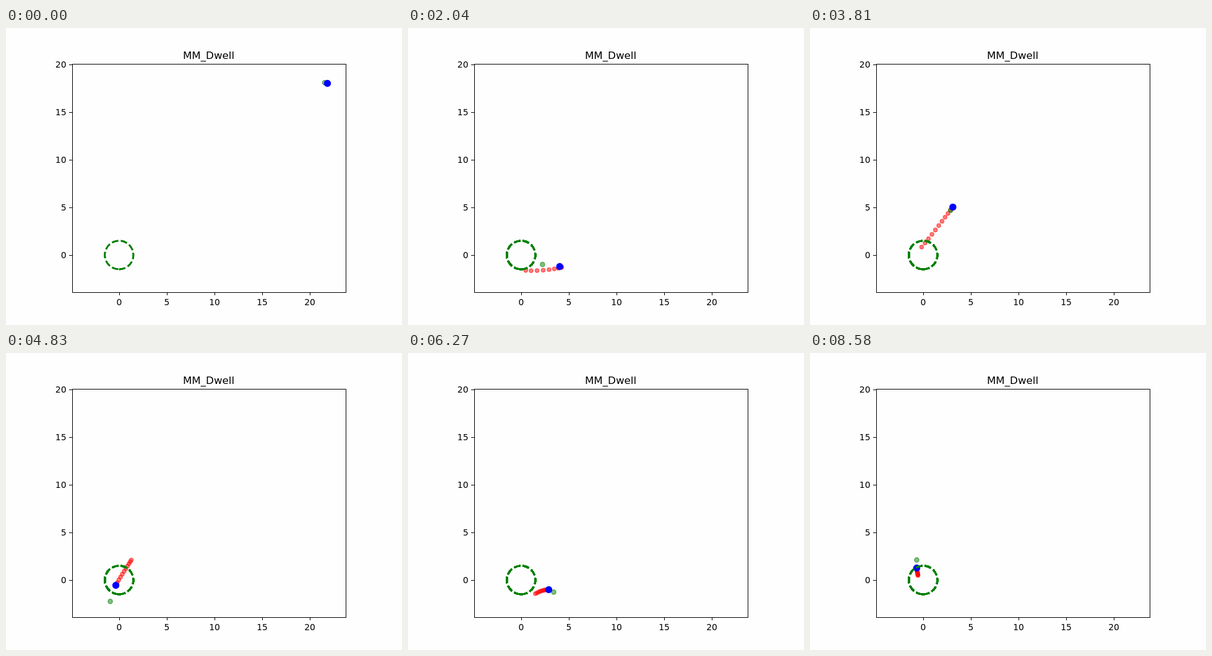
Animation, 640 px wide and 480 px high, one loop 8.61 s. Source, as an HTML page with a canvas:

```html
<!DOCTYPE html>
<html lang="en">
<head>
<meta charset="utf-8">
<title>MM_Dwell</title>
<style>
  html, body { margin: 0; width: 100%; height: 100%; overflow: hidden; background: #fefefe; }
  canvas { display: block; width: 640px; height: 480px; }
</style>
</head>
<body>
<canvas id="plot" width="640" height="480"></canvas>
<script>
const ctx = document.getElementById('plot').getContext('2d');
const STEP = 30, STEPS = 287, TRAIL = 10;
const AHEAD = 6, REACH = 28;
const ORIGIN = { x: 182.8, y: 366.9 }, UNIT = 15.4;

// Turning points of the cursor: step, x, y
const path = [
  // approach
  [0, 519, 89], [20, 499, 88], [32, 449, 110], [36, 415, 152],
  [39, 369, 188], [42, 302, 237], [48, 188, 338],
  // swinging around the ring
  [56, 178, 388], [66, 248, 386], [84, 159, 374], [94, 140, 359],
  [100, 135, 345], [112, 157, 376], [129, 236, 282], [137, 210, 316],
  [151, 202, 334], [161, 177, 375], [167, 168, 401], [181, 170, 362],
  [195, 196, 390], [203, 215, 384], [209, 227, 382], [215, 235, 386],
  [227, 195, 381], [237, 166, 373], [243, 154, 362], [252, 174, 374],
  [276, 174, 359], [286, 172, 347], [292, 172, 334]
];

// Smooth curve through unevenly timed points
function at(t) {
  let i = 0;
  while (i < path.length - 2 && path[i + 1][0] <= t) i++;
  const a = path[i], b = path[i + 1], h = b[0] - a[0], u = (t - a[0]) / h;
  const p = path[Math.max(i - 1, 0)], q = path[Math.min(i + 2, path.length - 1)];
  const u2 = u * u, u3 = u2 * u;
  return [1, 2].map(k => {
    const m0 = (b[k] - p[k]) / (b[0] - p[0]) * h;
    const m1 = (q[k] - a[k]) / (q[0] - a[0]) * h;
    return (2 * u3 - 3 * u2 + 1) * a[k] + (u3 - 2 * u2 + u) * m0 +
      (3 * u2 - 2 * u3) * b[k] + (u3 - u2) * m1;
  });
}

// Predicted position: a few steps ahead, within a limited distance
function predict(n) {
  const [x, y] = at(n), [fx, fy] = at(n + AHEAD);
  const k = Math.min(1, REACH / Math.hypot(fx - x, fy - y));
  return [x + (fx - x) * k, y + (fy - y) * k];
}

function dot([x, y], r, color, alpha) {
  ctx.globalAlpha = alpha;
  ctx.fillStyle = ctx.strokeStyle = color;
  ctx.lineWidth = 1.39;
  ctx.beginPath();
  ctx.arc(x + 0.5, y + 0.5, r, 0, 2 * Math.PI);
  ctx.fill();
  ctx.stroke();
  ctx.globalAlpha = 1;
}

function label(text, x, y, size, align) {
  ctx.font = size + 'px "DejaVu Sans", sans-serif';
  ctx.textAlign = align;
  ctx.fillText(text, x, y);
}

function axes() {
  ctx.fillStyle = ctx.strokeStyle = '#000';
  ctx.lineWidth = 1;
  ctx.strokeRect(107.5, 58.5, 442, 369);
  for (let v = 0; v <= 20; v += 5) {
    const x = Math.round(ORIGIN.x + v * UNIT), y = Math.round(ORIGIN.y - v * UNIT);
    ctx.fillRect(x, 428, 1, 4);
    ctx.fillRect(102, y, 5, 1);
    label(v, x, 448, 13.89, 'center');
    label(v, 97.5, y + 5, 13.89, 'right');
  }
  label('MM_Dwell', 327.5, 50, 16.67, 'center');
}

// The ring is stamped again on each step, so its edges harden
function ring(times) {
  ctx.strokeStyle = '#008000';
  ctx.lineWidth = 2.78;
  ctx.setLineDash([10.28, 4.44]);
  ctx.beginPath();
  ctx.arc(ORIGIN.x, ORIGIN.y, 1.5 * UNIT, Math.PI / 2, -1.5 * Math.PI, true);
  for (let i = 0; i < times; i++) ctx.stroke();
  ctx.setLineDash([]);
}

function draw(n) {
  ctx.fillStyle = '#fefefe';
  ctx.fillRect(0, 0, 640, 480);
  for (let i = Math.max(0, n - TRAIL); i < n; i++) dot(at(i), 3.1, '#f00', 0.5);
  dot(predict(n), 3.7, '#008000', 0.5);
  dot(at(n), 5, '#00f', 1);
  ring(Math.min(n + 2, 60));
  axes();
}

const start = performance.now();
function tick() {
  const t = Math.max(0, performance.now() - start);
  draw(Math.floor(t / STEP + 0.001) % STEPS);
  requestAnimationFrame(tick);
}
tick();
</script>
</body>
</html>
```
